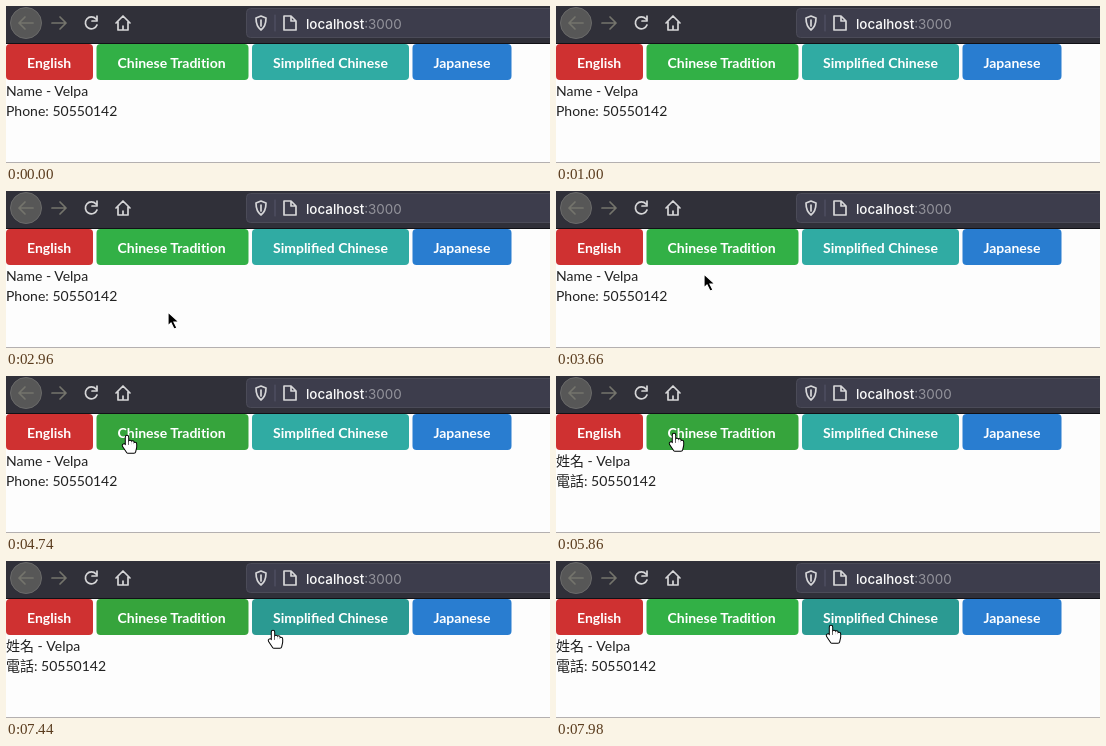
Write an HTML page that moves like this. It is 544 by 157 pixels and loops after 8000 ms.

```html
<!DOCTYPE html>
<html lang="en">
<head>
<meta charset="utf-8">
<title>Language switcher</title>
<style>
html, body { margin: 0; width: 100%; height: 100%; overflow: hidden; background: #fdfdfd; }
svg { display: block; }
text { font: 14px Lato, "Noto Sans CJK TC", "Noto Sans CJK", sans-serif; fill: #212121; }
.label { font-weight: 700; fill: #fff; }
.url { font: 500 13.4px Inter, sans-serif; fill: #fafafa; }
.port { font-weight: 400; fill: #94949c; }
.icon { fill: none; stroke: #d6d6d8; stroke-width: 1.7; stroke-linecap: round; stroke-linejoin: round; }
.dim { stroke: #74746c; }
#hand { stroke-linecap: round; stroke-linejoin: round; }
</style>
</head>
<body>
<svg width="544" height="157" viewBox="0 0 544 157">
  <rect width="544" height="38" fill="#303039"/>
  <rect y="37" width="544" height="1" fill="#111116"/>
  <rect x="240.5" y="2.5" width="320" height="29" rx="4" fill="#3d3d4c" stroke="#4b4b58"/>
  <circle cx="20" cy="17" r="15.5" fill="#575757" stroke="#6a6a6a"/>
  <g class="icon">
    <path class="dim" d="M27 17H13M19 11l-6 6 6 6M46 17h14M54 11l6 6-6 6"/>
    <path d="M90 13a6 6 0 1 0 1 6M91 10v5h-5"/>
    <path d="M110 17l7-7 7 7M112 16v8h10v-8M117 24v-4"/>
    <path d="M255 10l5 2c0 6-1 9-5 12-4-3-5-6-5-12zM255 14v6"/>
    <path d="M278 10h7l5 5v9h-12zM285 10v5h5"/>
    <path d="M269 9v16" stroke="#56566a" stroke-width="1"/>
  </g>
  <text class="url" x="300" y="22.5">localhost<tspan class="port">:3000</tspan></text>
  <g id="buttons"></g>
  <text id="name" y="90"></text>
  <text id="phone" y="110"></text>
  <rect y="156" width="544" height="1" fill="#b4b0b0"/>
  <path id="arrow" d="M0 0v14l3-3 3 6 3-1-3-6h5z" stroke="#fff" stroke-width="1.2"/>
  <g id="hand">
    <path id="fingers" d="M0 1V10M3 6v4M5.5 6.5v4M8 8v3l-1 4.5H1L-3 9.5" stroke="#000" stroke-width="4.4"/>
    <use href="#fingers"/>
  </g>
</svg>
<script>
const LOOP = 8000, TOP = 38, HEIGHT = 36, GAP = 3.5, PAD = 21;
const FIRST_CLICK = 5480, SECOND_CLICK = 7960;
const $ = id => document.getElementById(id);

// The fingers drawn again, thinner and white, leave a black outline
const inner = $('fingers').cloneNode();
inner.removeAttribute('id');
inner.setAttribute('stroke', '#fff');
inner.setAttribute('stroke-width', 2.4);
inner.setAttribute('fill', '#fff');
$('hand').replaceChild(inner, $('hand').querySelector('use'));

const buttons = [
  { label: 'English', w: 87, base: '#cf3131', hover: '#c02424' },
  { label: 'Chinese Tradit&zwnj;ion', w: 152, base: '#32b046', hover: '#36a43c' },
  { label: 'Simplified Chinese', w: 157, base: '#30aba3', hover: '#2b9a92' },
  { label: 'Japanese', w: 99, base: '#297dd0', hover: '#1f70c0' }
];
let left = 0;
for (const b of buttons) {
  b.x = left;
  left += b.w + GAP;
  $('buttons').innerHTML +=
    `<rect x="${b.x}" y="${TOP}" width="${b.w}" height="${HEIGHT}" rx="4"/>` +
    `<text class="label" x="${b.x + PAD}" y="62">${b.label}</text>`;
}
const rects = $('buttons').querySelectorAll('rect');

// Pointer stops, joined at steady speed
const stops = [
  { t: 2290, x: 176, y: 157 },
  { t: 3660, x: 148, y: 83 },
  { t: 4120, x: 148, y: 84 },
  { t: 4800, x: 118, y: 58 },
  { t: 6600, x: 118, y: 58 },
  { t: 7440, x: 267, y: 70 },
  { t: LOOP, x: 275, y: 65 }
];

function pointer(t) {
  const i = Math.max(1, stops.findIndex(s => s.t > t));
  const a = stops[i - 1], b = stops[i];
  const u = Math.max(0, (t - a.t) / (b.t - a.t));
  return [a.x + (b.x - a.x) * u, a.y + (b.y - a.y) * u];
}

function place(id, x, y, visible) {
  $(id).setAttribute('transform', `translate(${Math.round(x)} ${Math.round(y)})`);
  $(id).setAttribute('visibility', visible ? 'visible' : 'hidden');
}

function draw(t) {
  const [x, y] = pointer(t);
  const inRow = y >= TOP && y < TOP + HEIGHT;
  const over = inRow ? buttons.findIndex(b => x >= b.x && x < b.x + b.w) : -1;
  const chinese = t >= FIRST_CLICK;
  const focus = t >= SECOND_CLICK ? 2 : chinese ? 1 : -1;
  buttons.forEach((b, i) => rects[i].setAttribute('fill', i === over || i === focus ? b.hover : b.base));
  $('name').textContent = (chinese ? '姓名' : 'Name') + ' - Velpa';
  $('phone').textContent = (chinese ? '電話' : 'Phone') + ': 50550142';
  place('arrow', x, y, over < 0 && t >= stops[0].t);
  place('hand', x, y, over >= 0);
}

const start = performance.now();
function tick() {
  draw((performance.now() - start) % LOOP);
  requestAnimationFrame(tick);
}
tick();
</script>
</body>
</html>
```
